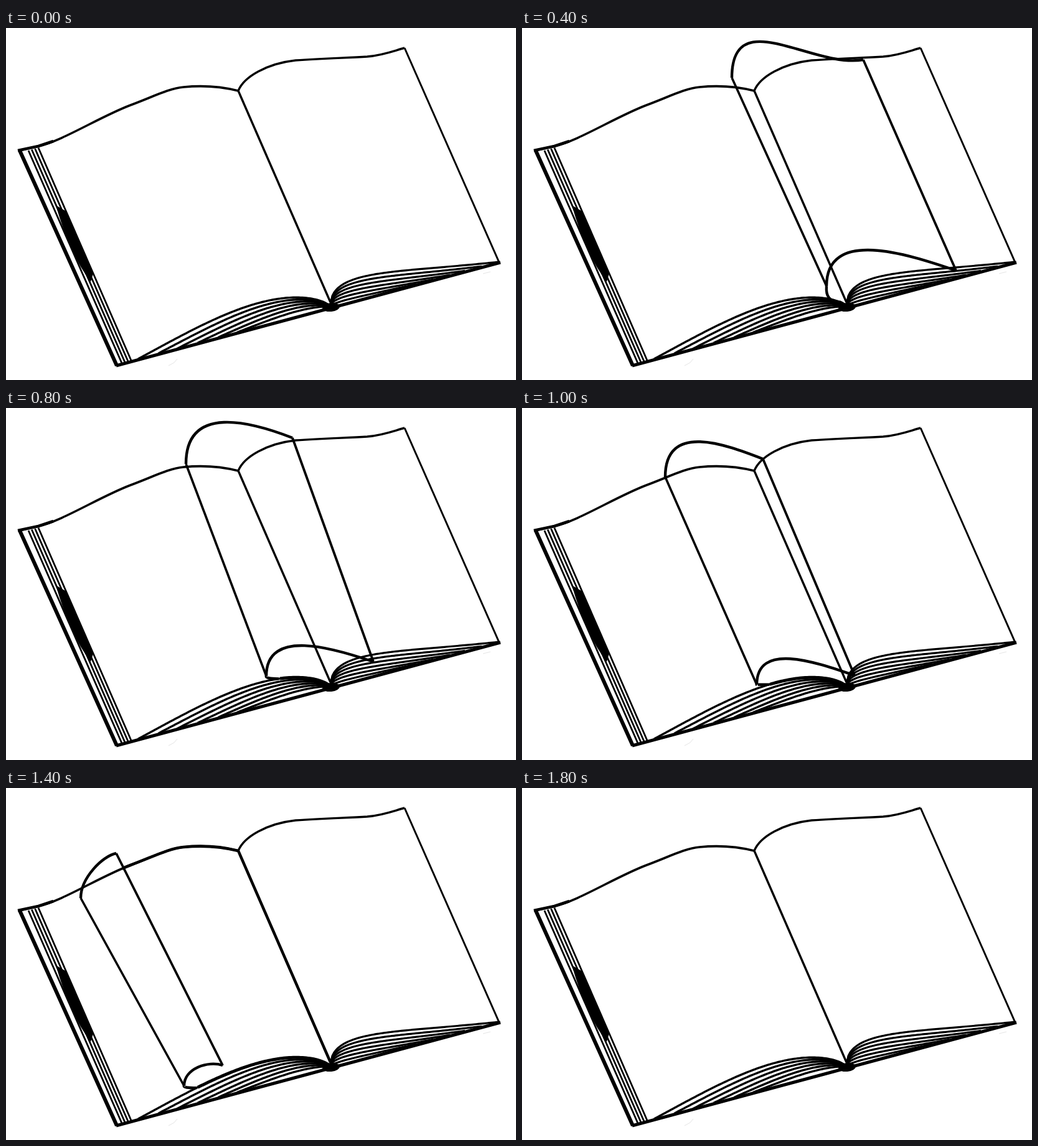
Animation of 819 by 566 pixels, one loop 1900 ms. Source, as an HTML page with a canvas:

```html
<!DOCTYPE html>
<html lang="en">
<head>
<meta charset="utf-8">
<title>Turning page</title>
<style>
html, body { margin: 0; width: 100%; height: 100%; overflow: hidden; background: #fff; }
canvas { display: block; }
</style>
</head>
<body>
<canvas id="stage" width="819" height="566"></canvas>
<script>
const ctx = document.getElementById('stage').getContext('2d');
const LOOP = 1900, STEP = 100;
const SPINE = { x: 521, y: 449 };
const SLOPE = -0.27; // of the lower cover edge

const topLeft = 'M21 197L52 190C90 182 150 143 200 124C235 111 262 97 285 95C315 92 345 94 373 101';
const topRight = 'M373 101C382 78 420 57 465 52C510 49 545 48 580 46C605 44 622 37 640 32';
const spine = 'M373 101L521 441';

// Corners of the turning page: upper fold, upper free, lower fold, lower free.
const poses = [
  [100, '373,100 621,38 521,437 770,381'],
  [400, '337,80 548,51 489,415 697,390'],
  [800, '289,90 460,48 418,431 590,408'],
  [1000, '230,111 387,82 377,445 534,430'],
  [1200, '157,124 285,63 324,453 436,408'],
  [1400, '120,177 177,105 286,479 348,446'],
  [1700, '39,196 64,166 208,502 232,492']
].map(([time, corners]) => ({ time, values: corners.split(/[ ,]/).map(Number) }));

function stroke(d, width, colour = '#000') {
  ctx.lineWidth = width;
  ctx.strokeStyle = colour;
  ctx.stroke(new Path2D(d));
}

// Height of a leaf's arched edge; side is -1 left of the spine, 1 right of it.
function leafY(x, side, length, height) {
  const s = Math.min(1, Math.max(0, (x - SPINE.x) * side / length));
  const arch = Math.sin(Math.PI * s ** (side < 0 ? 0.7 : 0.4));
  return SPINE.y + (x - SPINE.x) * SLOPE - height * arch;
}

const leftEdgeY = x => leafY(x, -1, 310, 38);

function leaf(side, length, height, width, reach = length) {
  let d = `M${SPINE.x} ${SPINE.y - 4}`;
  for (let i = 3; i <= reach; i += 3) {
    const x = SPINE.x + side * i;
    d += `L${x} ${leafY(x, side, length, height)}`;
  }
  stroke(d, width);
}

function drawBook() {
  stroke(topLeft, 3.6);
  stroke('M19 197L52 190L76 182', 4.6);
  stroke(topRight, 3.4);
  stroke('M640 32L792 377', 3);
  stroke(spine, 3.4);
  stroke('M22 197L178 543', 6);
  stroke('M177 543L794 377', 5);
  stroke('M261 543L270 538L275 532M766 395L778 392', 1, '#e4e4e4');

  for (let i = 0; i < 4; i++)
    stroke(`M${36 + 5.3 * i} ${197 - 1.5 * i}L${186 + 5 * i} ${539 - 1.5 * i}`, 2.8);
  for (let i = 0; i < 6; i++) {
    leaf(-1, 310 - 32 * i, 38 - 6 * i, 3.4);
    leaf(1, 270 - 26 * i, 35 - 6 * i, 3.2);
  }

  ctx.fillStyle = '#000';
  ctx.fill(new Path2D('M80 285L97 295L140 395L136 408Q103 365 80 285Z'));
  ctx.beginPath();
  ctx.ellipse(SPINE.x + 1, SPINE.y, 14, 7, -0.1, 0, Math.PI * 2);
  ctx.fill();
}

function cornersAt(time) {
  const i = Math.max(1, poses.findIndex(p => p.time >= time));
  const a = poses[i - 1], b = poses[i];
  const k = (time - a.time) / (b.time - a.time);
  return a.values.map((v, n) => v + (b.values[n] - v) * k);
}

// The page rises straight up at the fold and bends over to its free corner.
function curl(x, y, freeX, freeY, lift, exit) {
  const w = freeX - x;
  return `M${x} ${y}C${x} ${y - lift * w} ${freeX - 0.38 * w} ${freeY + exit * w} ${freeX} ${freeY}`;
}

function drawPage(time) {
  const [ax, ay, bx, by, cx, cy, dx, dy] = cornersAt(time);
  const rise = Math.min(1, time / 400);
  const exit = -0.05 - 0.12 * Math.cos(2 * Math.PI * (time - 900) / 1000);
  stroke(curl(ax, ay, bx, by, 0.57 * rise, exit), 4.4);
  stroke(curl(cx, cy, dx, dy, 0.45 * rise, -0.13), 4.4);
  stroke(`M${ax} ${ay}L${cx} ${cy}`, 3.6);
  stroke(`M${bx} ${by}L${dx} ${dy}`, 3.8);

  // The part already lying on the left side thickens the lines below it.
  const restX = Math.min(SPINE.x, cx + 20), restY = leftEdgeY(restX);
  stroke(`M${cx} ${cy}Q${cx - 2} ${restY} ${restX} ${restY}`, 4.4);
  leaf(-1, 310, 38, 5, SPINE.x - restX);
  if (bx < 373) {
    ctx.save();
    ctx.beginPath();
    ctx.rect(bx + 10, 0, 819, 566);
    ctx.clip();
    stroke(topLeft, 4.6);
    ctx.restore();
    stroke(spine, 4.4);
  }
}

function frame() {
  const time = Math.floor(performance.now() % LOOP / STEP) * STEP;
  ctx.fillStyle = '#fff';
  ctx.fillRect(0, 0, 819, 566);
  drawBook();
  if (time >= 100 && time < 1800) drawPage(time);
  requestAnimationFrame(frame);
}
frame();
</script>
</body>
</html>
```
